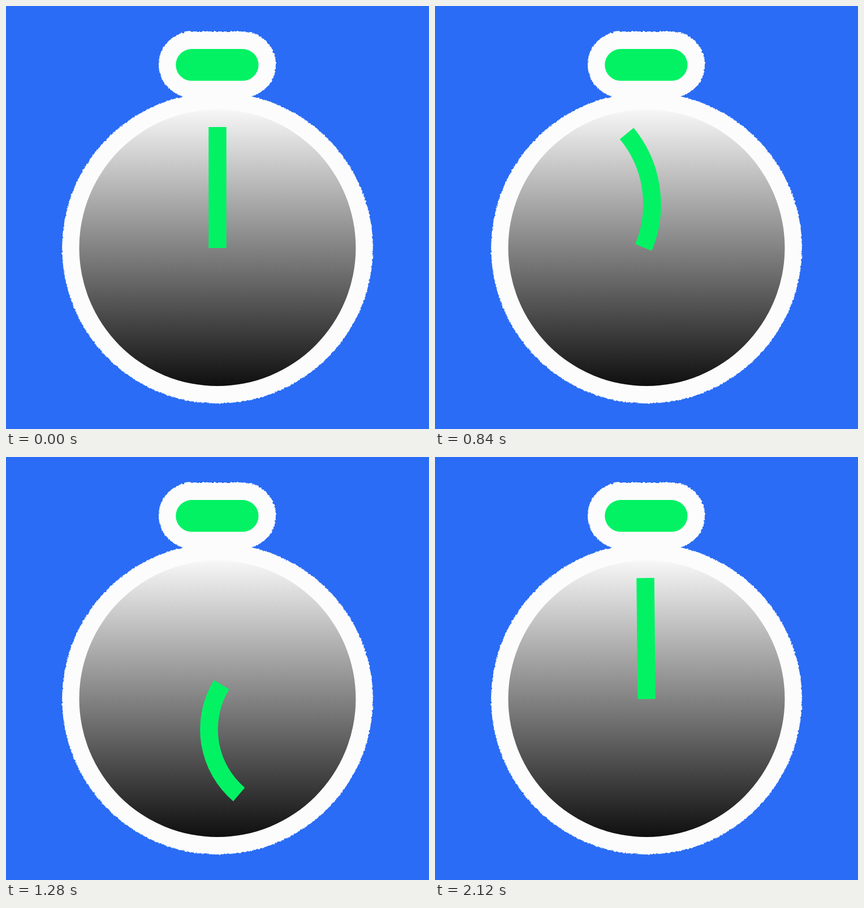
Animation, 748 px wide and 748 px high, one loop 2160 ms. Source, as an HTML page:

```html
<!DOCTYPE html>
<html lang="en">
<head>
<meta charset="utf-8">
<title>Stopwatch</title>
<style>
  html, body { margin: 0; width: 100%; height: 100%; overflow: hidden; background: #2a6cf5; }
  svg { display: block; width: 100vw; height: 100vh; }
</style>
</head>
<body>
<svg viewBox="0 0 748 748">
  <defs>
    <linearGradient id="shade" x1="0" y1="0" x2="0" y2="1">
      <stop offset="0" stop-color="#f7f7f7"/>
      <stop offset="1" stop-color="#0f0f0f"/>
    </linearGradient>
    <filter id="rough" color-interpolation-filters="sRGB">
      <feTurbulence type="fractalNoise" baseFrequency=".25" numOctaves="2" seed="4"/>
      <feDisplacementMap in="SourceGraphic" scale="4" xChannelSelector="R" yChannelSelector="G"/>
    </filter>
  </defs>
  <g fill="#fcfcfc" filter="url(#rough)">
    <circle cx="374" cy="428" r="274.8"/>
    <rect x="270" y="45" width="207" height="117" rx="58.5"/>
  </g>
  <rect x="300.3" y="76" width="146.2" height="56.3" rx="28.1" fill="#02f264"/>
  <circle cx="374" cy="427.5" r="244.5" fill="url(#shade)"/>
  <path id="hand" fill="none" stroke="#02f264" stroke-width="31.5"/>
</svg>
<script>
const LOOP = 2160, STEP = 40, LENGTH = 214;
const PIVOT = { x: 374, y: 414.3 }, TAIL = 13.7;
const hand = document.getElementById("hand");

// cubic Bezier easing, solved for x by bisection
function bezier(x1, y1, x2, y2) {
  const at = (s, a, b) => 3 * s * (1 - s) * ((1 - s) * a + s * b) + s ** 3;
  return u => {
    let lo = 0, hi = 1;
    for (let i = 0; i < 24; i++) {
      const mid = (lo + hi) / 2;
      if (at(mid, x1, x2) < u) lo = mid; else hi = mid;
    }
    return at(lo, y1, y2);
  };
}
const smooth = bezier(1 / 3, 0, 2 / 3, 1);

// heading of the hand's base in degrees: wind back, swing round, settle
const heading = [
  { t: 320, v: 0 },
  { t: 500, v: -11.5, ease: smooth },
  { t: 1500, v: 370, ease: bezier(0.7, 0, 0.917, 1) },
  { t: 1960, v: 357.8, ease: smooth },
  { t: 2200, v: 360, ease: smooth }
];
// bend from base to tip in degrees
const bending = [
  { t: 320, v: 0 },
  { t: 1160, v: -107.5, ease: bezier(1 / 3, 0.234, 2 / 3, 0.63) },
  { t: 1700, v: 0, ease: bezier(1 / 3, 0.323, 2 / 3, 0.919) }
];

function valueAt(track, t) {
  if (t <= track[0].t) return track[0].v;
  const i = track.findIndex(k => k.t > t);
  if (i < 0) return track[track.length - 1].v;
  const a = track[i - 1], b = track[i];
  return a.v + (b.v - a.v) * b.ease((t - a.t) / (b.t - a.t));
}

function draw(now) {
  const t = Math.floor((now % LOOP) / STEP) * STEP;
  const rad = Math.PI / 180;
  const base = valueAt(heading, t) * rad, bend = valueAt(bending, t) * rad;
  const half = bend / 2, straight = Math.abs(bend) < 0.002;
  const chord = straight ? LENGTH : LENGTH * Math.sin(half) / half;
  const x = PIVOT.x - TAIL * Math.sin(base), y = PIVOT.y + TAIL * Math.cos(base);
  const tip = `${x + chord * Math.sin(base + half)} ${y - chord * Math.cos(base + half)}`;
  const r = LENGTH / Math.abs(bend);
  const line = straight ? "L" : `A${r} ${r} 0 0 ${bend > 0 ? 1 : 0} `;
  hand.setAttribute("d", `M${x} ${y}${line}${tip}`);
}

const start = performance.now();
function tick() {
  draw(performance.now() - start);
  requestAnimationFrame(tick);
}
tick();
</script>
</body>
</html>
```
